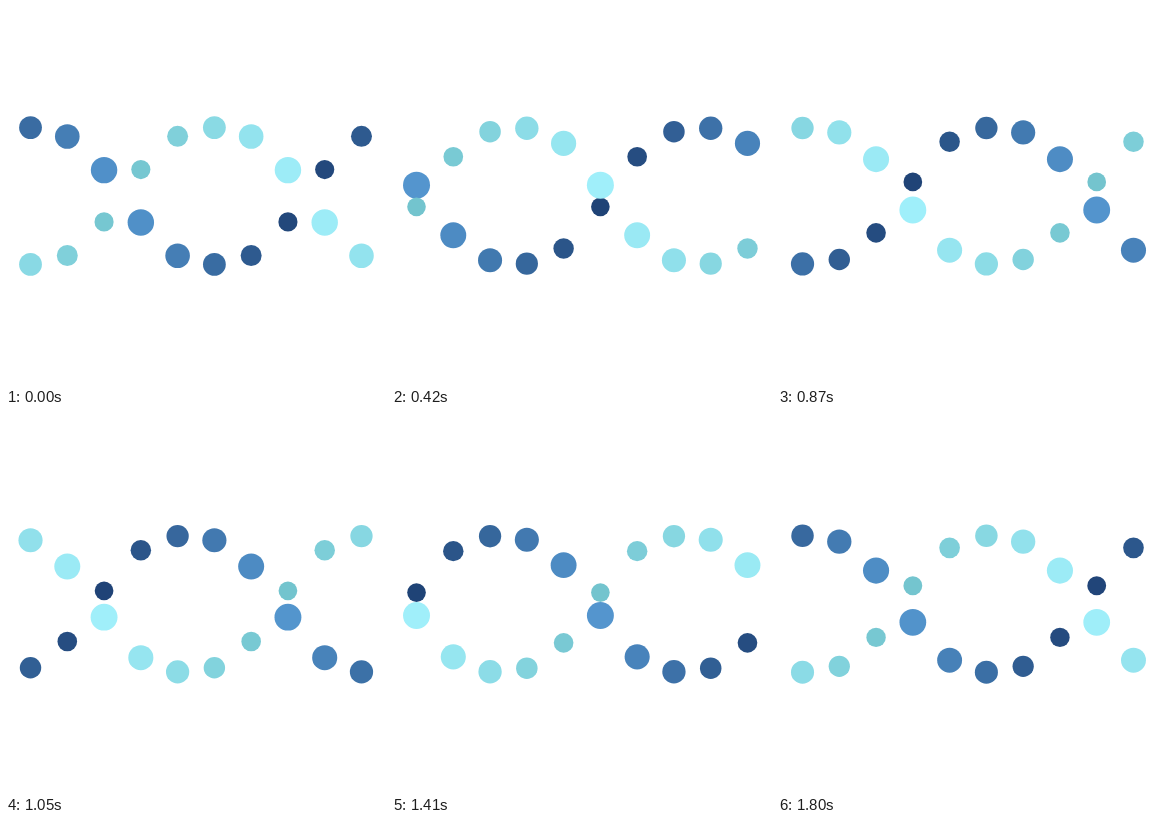
Recreate the animation shown at these times as an HTML page with a canvas. Size 380 px wide and 380 px high, loop 1830 ms.

```html
<!DOCTYPE html>
<html lang="en">
<head>
<meta charset="utf-8">
<title>Double helix loader</title>
<style>
  html, body { margin: 0; width: 100%; height: 100%; overflow: hidden; background: #fff; }
  canvas { display: block; width: 380px; height: 380px; }
</style>
</head>
<body>
<canvas id="stage"></canvas>
<script>
const SIZE = 380, PERIOD = 1830, COLUMNS = 10;
const UNIT = SIZE / 100;
const TOP = 32, BOTTOM = 68, R_MIN = 2.4, R_MAX = 3.6;
const BLUE = [[29, 63, 114], [86, 153, 210]];
const CYAN = [[113, 194, 204], [162, 241, 252]];

const canvas = document.getElementById('stage');
const ctx = canvas.getContext('2d');
const ratio = window.devicePixelRatio || 1;
canvas.width = canvas.height = SIZE * ratio;
ctx.scale(ratio * UNIT, ratio * UNIT);

const mix = (a, b, k) => a + (b - a) * k;
const wrap = u => u - Math.floor(u);
// 0 -> 1 -> 0 over one cycle
const triangle = u => 1 - Math.abs(1 - 2 * wrap(u));

// cubic-bezier(.5, 0, .5, 1)
function ease(x) {
  let lo = 0, hi = 1;
  for (let i = 0; i < 30; i++) {
    const s = (lo + hi) / 2;
    if (1.5 * s * (1 - s) + s * s * s < x) lo = s; else hi = s;
  }
  return lo * lo * (3 - 2 * lo);
}

function dot(column, phase, [far, near]) {
  const x = 100 * (2 + 3 * column) / 31;
  const y = mix(TOP, BOTTOM, ease(triangle(phase)));
  const depth = triangle(phase + 0.25);
  const rgb = far.map((c, i) => Math.round(mix(c, near[i], depth)));
  ctx.fillStyle = `rgb(${rgb})`;
  ctx.beginPath();
  ctx.arc(x, y, mix(R_MIN, R_MAX, depth), 0, Math.PI * 2);
  ctx.fill();
}

function draw() {
  const turn = performance.now() / PERIOD;
  ctx.fillStyle = '#fff';
  ctx.fillRect(0, 0, 100, 100);
  for (let c = 0; c < COLUMNS; c++) {
    const phase = turn + c / COLUMNS;
    dot(c, phase, BLUE);
    dot(c, phase + 0.5, CYAN);
  }
  requestAnimationFrame(draw);
}
draw();
</script>
</body>
</html>
```
